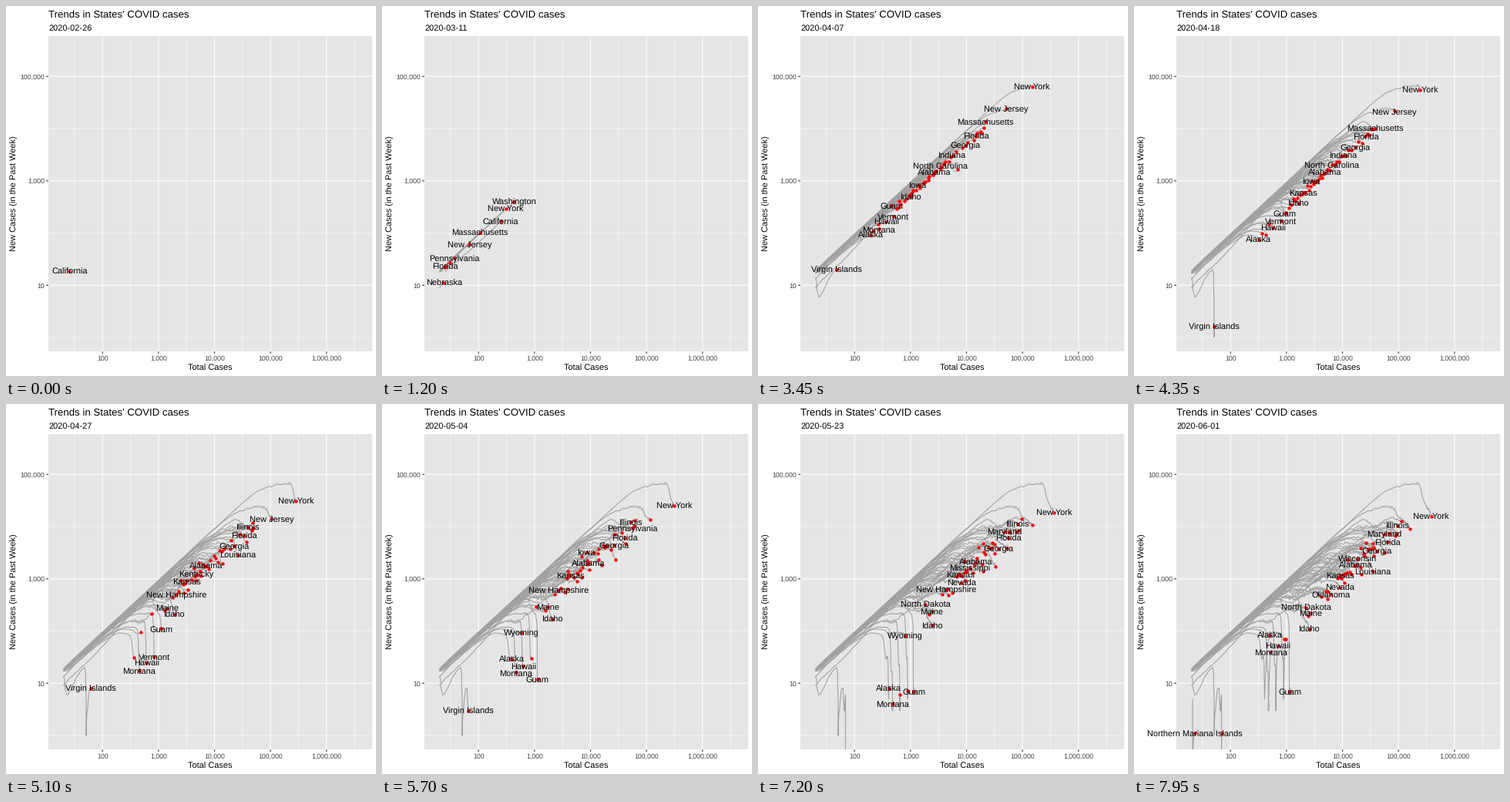
A matplotlib script that plays this animation: 480x480 px, repeating every 8000 ms.

```python
import matplotlib.pyplot as plt
import numpy as np
from matplotlib.animation import FuncAnimation
from matplotlib.collections import LineCollection
from matplotlib.patches import Rectangle

plt.rcParams["font.family"] = "Liberation Sans"
plt.rcParams["text.hinting"] = "none"

PX = 0.72  # points per pixel at 100 dpi
LEFT, TOP, RIGHT, BOTTOM = 55, 39, 474.5, 448.3
LABEL_HEIGHT = 7.6
DAYS = np.arange(-7, 99)
MIN_CASES = 20
rng = np.random.default_rng(4)

# From most to fewest cases in mid April
BY_SIZE = """New York, New Jersey, Massachusetts, Pennsylvania, California, Michigan,
Illinois, Florida, Louisiana, Texas, Georgia, Connecticut, Maryland, Washington, Indiana,
Ohio, Colorado, Virginia, Tennessee, North Carolina, Missouri, Arizona, Alabama,
Rhode Island, South Carolina, Wisconsin, Mississippi, Nevada, Utah, Kentucky,
District of Columbia, Iowa, Delaware, Oklahoma, Minnesota, Oregon, Kansas, New Mexico,
Arkansas, Idaho, South Dakota, New Hampshire, Nebraska, Puerto Rico, Maine, West Virginia,
Guam, Vermont, Hawaii, North Dakota, Montana, Wyoming, Alaska, Virgin Islands,
Northern Mariana Islands""".replace("\n", " ").split(", ")

# Logarithmic growth from mid April to June; the others share a typical value
TYPICAL_GROWTH = 1.25
GROWTH = {
    0.2: "Vermont, Hawaii, Montana",
    0.45: "New York, Alaska, Louisiana, Idaho",
    0.63: "New Jersey, Michigan, Washington",
    0.9: "Pennsylvania, Florida, Georgia, Connecticut, Missouri, Nevada, Oklahoma, "
         "Oregon, West Virginia, Wyoming, Massachusetts, Colorado, Maine, South Carolina",
    1.5: "Maryland, Virginia, North Carolina, Arizona, Wisconsin, New Mexico, "
         "North Dakota, Arkansas, Kansas",
    2.2: "Minnesota, Nebraska, Iowa",
}
growth_of = {name: g for g, names in GROWTH.items() for name in names.split(", ")}
STALLED = {"Vermont", "Hawaii", "Montana", "Alaska"}

# Day and total for the first outbreaks and the islands
KEY_POINTS = {
    "California": {-7: 7, 0.2: 25.6, 14.7: 250, 31: 5560},
    "Washington": {6: 20, 14.7: 430, 31: 4330},
    "New York": {8: 20, 14.7: 323, 31: 53200},
    "Massachusetts": {8: 5, 14.7: 108, 31: 4257},
    "Nebraska": {8: 13, 14.7: 24, 31: 121},
    "Guam": {24: 14, 31: 56, 46: 720, 62: 1112, 78: 1132, 96: 1150},
    "Virgin Islands": {25: 17, 32: 23, 44: 50, 51: 51, 62: 62, 70: 66, 71: 69,
                       95: 69, 96: 70},
    "Northern Mariana Islands": {73: 16, 80: 16, 81: 21, 88: 21, 89: 22, 95: 22, 96: 23},
}


def x_pos(cases):
    return 125.2 + 72.65 * (np.log10(cases) - 2)


def y_pos(cases):
    return 362.3 - 67.75 * (np.log10(cases) - 1)


def outbreak(name):
    """Key days and totals: fast early growth that levels off after mid April."""
    april = 10 ** np.interp(BY_SIZE.index(name),
                            [0, 1, 2, 7, 12, 22, 32, 42, 47, 48, 52, 53, 54],
                            [5.39, 4.93, 4.58, 4.41, 4.1, 3.69, 3.43, 3.13,
                             2.9, 2.76, 2.5, 1.72, 1.15])
    gain = growth_of.get(name, TYPICAL_GROWTH)
    march = april * np.exp(-1.4 - 0.45 * gain)
    first = 0.17 * march ** 0.6 * np.exp(rng.normal(0, 0.2))
    knots = {15: first, 31: march, 42: march ** 0.3 * april ** 0.7, 52.7: april}
    later = {62: 0.3, 71: 0.5, 88: 0.6, 96: 1} if name in STALLED else {78: 0.72, 96: 1}
    knots.update({day: april * np.exp(gain * share) for day, share in later.items()})
    keys = KEY_POINTS.get(name)
    if keys:
        knots = {d: c for d, c in knots.items() if not min(keys) <= d <= max(keys)}
        knots.update(keys)
    return knots


def smooth(knots, x):
    """Monotone cubic through the logarithms of the totals."""
    d = np.array(sorted(knots), float)
    v = np.log([knots[k] for k in sorted(knots)])
    h = np.diff(d)
    s = np.diff(v) / h + 1e-9
    m = np.empty(len(d))
    m[1:-1] = 2 / (1 / s[:-1] + 1 / s[1:])
    m[0] = s[0]
    m[-1] = min(s[-1] ** 2 / m[-2], s[-1])
    xc = np.clip(x, d[0], d[-1])
    k = np.clip(np.searchsorted(d, xc) - 1, 0, len(h) - 1)
    u = (xc - d[k]) / h[k]
    log_total = (v[k] + (v[k + 1] - v[k]) * u * u * (3 - 2 * u)
                 + h[k] * u * (1 - u) * (m[k] * (1 - u) - m[k + 1] * u))
    log_total += m[0] * np.minimum(x - d[0], 0) + m[-1] * np.maximum(x - d[-1], 0)
    return np.exp(log_total)


class Track:
    def __init__(self, name):
        self.name = name
        total = smooth(outbreak(name), DAYS)
        jitter = 0.15 * rng.normal(size=len(DAYS)) * np.gradient(total)
        total = np.round(total + np.where(total > 300, jitter, 0))
        new = total[7:] - total[:-7]
        total = total[7:]
        self.first = int(np.argmax(total >= MIN_CASES))
        self.valid = new >= 1
        self.path = np.column_stack([x_pos(np.maximum(total, 1)),
                                     y_pos(np.maximum(new, 0.3))])

    def at(self, t):
        """Trail up to time t and the head, or None while it has no new cases."""
        if t < self.first:
            return None, None
        i = int(t)
        trail = self.path[self.first:i + 1]
        if not (self.valid[i] and self.valid[i + 1]):
            return trail, None
        head = self.path[i] + (t - i) * (self.path[i + 1] - self.path[i])
        return np.vstack([trail, head]), head


# Labels compete for room in the text order of their ranks: 1, 10, 11, ..., 2, 20, ...
names = sorted(BY_SIZE)
tracks = [Track(names[r - 1]) for r in sorted(range(1, len(names) + 1), key=str)]

fig = plt.figure(figsize=(4.8, 4.8), dpi=100, facecolor="white")
ax = fig.add_axes([0, 0, 1, 1])
ax.set(xlim=(0, 480), ylim=(480, 0))
ax.axis("off")
panel = Rectangle((LEFT, TOP), RIGHT - LEFT, BOTTOM - TOP, fc="#E5E5E5", lw=0)
ax.add_patch(panel)


def rule(xs, ys, color, width, z):
    ax.plot(xs, ys, color=color, lw=width * PX, zorder=z,
            solid_capstyle="butt", snap=False)


def write(x, y, text, size, color="black", **kw):
    return ax.text(x, y, text, fontsize=size * PX, color=color, **kw)


def grid_line(xs, ys, major):
    rule(xs, ys, "white", 1.07 if major else 0.53, 1.2 if major else 1.1)


for half in range(3, 14):
    x = x_pos(10 ** (half / 2))
    major = half % 2 == 0
    grid_line([x, x], [TOP, BOTTOM], major)
    if major:
        rule([x, x], [BOTTOM, BOTTOM + 2.75], "#2B2B2B", 1.07, 1.3)
        write(x, 460.2, f"{10 ** (half // 2):,}", 8.8, "#434343", ha="center")

for power in range(6):
    y = y_pos(10 ** power)
    major = power % 2 == 1
    grid_line([LEFT, RIGHT], [y, y], major)
    if major:
        rule([LEFT - 2.75, LEFT], [y, y], "#2B2B2B", 1.07, 1.3)
        write(50, y + 3.2, f"{10 ** power:,}", 8.8, "#434343", ha="right")

write(LEFT, 15, "Trends in States' COVID cases", 13.2)
date_text = write(LEFT, 32, "", 11)
write((LEFT + RIGHT) / 2, 473, "Total Cases", 11, ha="center")
write(13.5, (TOP + BOTTOM) / 2, "New Cases (in the Past Week)", 11,
      ha="center", rotation=90, rotation_mode="anchor")

trails = LineCollection([], colors="#A1A1A1", linewidths=1.07 * PX, zorder=2)
ax.add_collection(trails)
dots, = ax.plot([], [], "o", ms=4.4 * PX, color="#FB0007", mew=0, zorder=3)
labels = [write(0, 0, track.name, 11.04, ha="center", zorder=4) for track in tracks]
renderer = fig.canvas.get_renderer()
half_widths = [label.get_window_extent(renderer).width / 2 for label in labels]
for artist in [trails, dots, *labels]:
    artist.set_clip_path(panel)


def draw(frame):
    t = 1.81 * (frame // 3) + 0.2
    date_text.set_text(str(np.datetime64("2020-02-26") + int(t)))
    lines, heads, placed = [], [], []
    for track, label, half in zip(tracks, labels, half_widths):
        label.set_visible(False)
        line, head = track.at(t)
        if line is not None:
            lines.append(line)
        if head is None:
            continue
        heads.append(head)
        x, y = head
        if all(abs(x - px) >= half + ph or abs(y - py) >= LABEL_HEIGHT
               for px, py, ph in placed):
            placed.append((x, y, half))
            label.set_position((x, y + 4))
            label.set_visible(True)
    trails.set_segments(lines)
    dots.set_data(*np.array(heads).T)
    return [date_text, trails, dots, *labels]


anim = FuncAnimation(fig, draw, frames=160, interval=50, repeat=True, repeat_delay=0)
plt.show()
```
